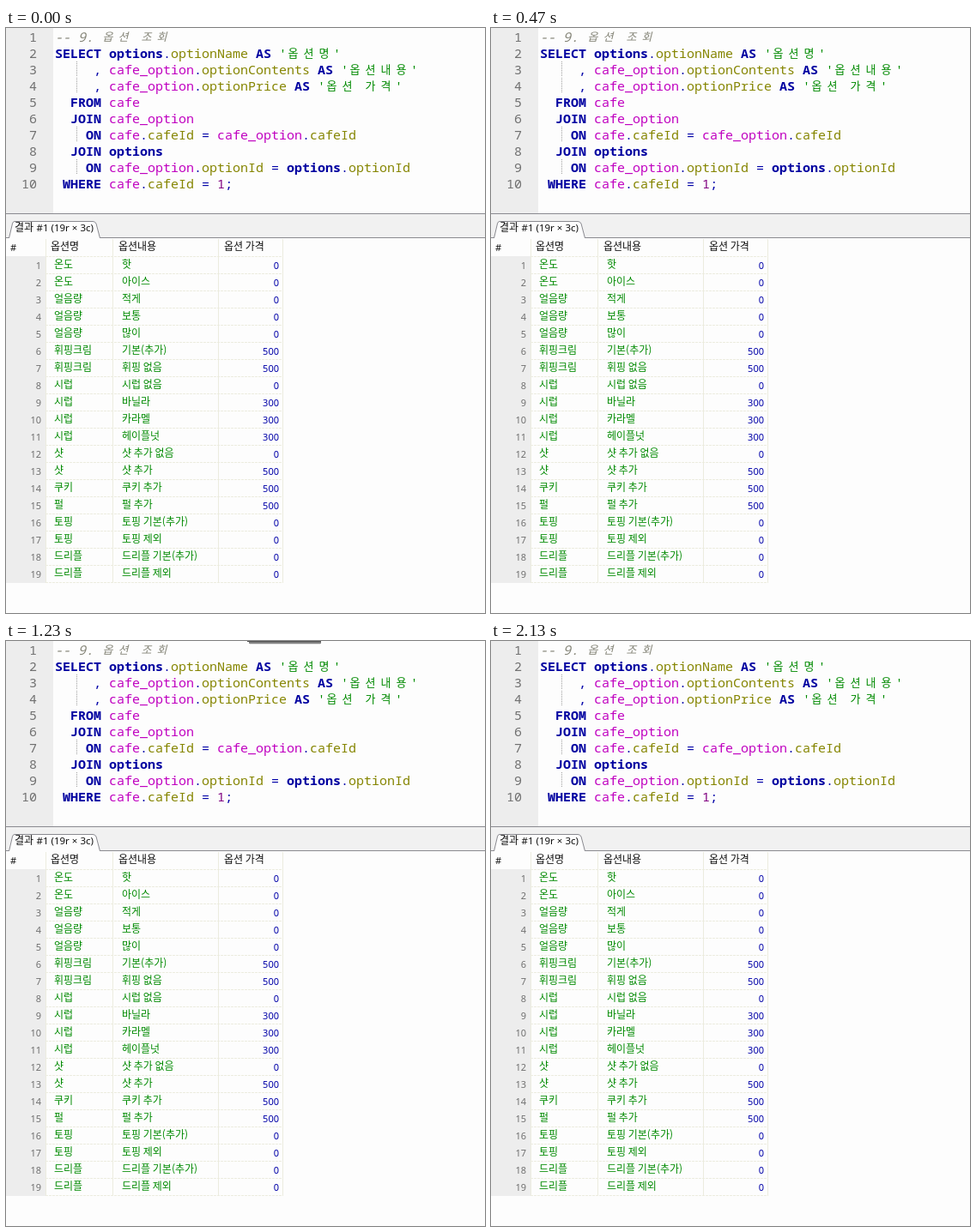
Recreate the animation shown at these times as an HTML page with a canvas. Size 558 by 682 pixels, loop 2160 ms.

```html
<!DOCTYPE html>
<html lang="ko">
<head>
<meta charset="utf-8">
<style>
html, body { margin: 0; width: 558px; height: 682px; overflow: hidden; background: #fdfdfd; }
canvas { display: block; }
</style>
</head>
<body>
<canvas id="stage" width="558" height="682"></canvas>
<script>
const ctx = document.getElementById('stage').getContext('2d');
const LOOP = 2160;
const MONO = '"Noto Sans Mono", "DejaVu Sans Mono", monospace';
const KOREAN = '"Noto Sans CJK KR", "Noto Sans CJK JP", "Noto Sans CJK", sans-serif';
const UI = '"Noto Sans", "Open Sans", sans-serif';
const PAPER = '#fdfdfd', PANEL = '#f1f1f1', GUTTER = '#ededed';
const GRID = '#ececdf', EDGE = '#8a8a90';
const LABEL = '#111', NUMBER = '#707070';
const CELL = 9, CODE_X = 57;

// Token kinds: k keyword, t table, c column, s string, p punctuation, n number, r comment
const INK = { k: '#0000a0', t: '#c000c0', c: '#858500', s: '#008a00', p: '#0000a8', n: '#800080', r: '#858578' };
const CODE = [
  [0, 'r:-- 9. 옵션 조회'],
  [0, 'k:SELECT ', 'k:options', 'p:.', 'c:optionName ', 'k:AS ', "s:'옵션명'"],
  [5, 'p:, ', 't:cafe_option', 'p:.', 'c:optionContents ', 'k:AS ', "s:'옵션내용'"],
  [5, 'p:, ', 't:cafe_option', 'p:.', 'c:optionPrice ', 'k:AS ', "s:'옵션 가격'"],
  [2, 'k:FROM ', 't:cafe'],
  [2, 'k:JOIN ', 't:cafe_option'],
  [4, 'k:ON ', 't:cafe', 'p:.', 'c:cafeId ', 'p:= ', 't:cafe_option', 'p:.', 'c:cafeId'],
  [2, 'k:JOIN ', 'k:options'],
  [4, 'k:ON ', 't:cafe_option', 'p:.', 'c:optionId ', 'p:= ', 'k:options', 'p:.', 'c:optionId'],
  [1, 'k:WHERE ', 't:cafe', 'p:.', 'c:cafeId ', 'p:= ', 'n:1', 'p:;']
];
const ROWS = [
  ['온도', '핫', 0], ['온도', '아이스', 0],
  ['얼음량', '적게', 0], ['얼음량', '보통', 0], ['얼음량', '많이', 0],
  ['휘핑크림', '기본(추가)', 500], ['휘핑크림', '휘핑 없음', 500],
  ['시럽', '시럽 없음', 0], ['시럽', '바닐라', 300], ['시럽', '카라멜', 300], ['시럽', '헤이플넛', 300],
  ['샷', '샷 추가 없음', 0], ['샷', '샷 추가', 500],
  ['쿠키', '쿠키 추가', 500], ['펄', '펄 추가', 500],
  ['토핑', '토핑 기본(추가)', 0], ['토핑', '토핑 제외', 0],
  ['드리플', '드리플 기본(추가)', 0], ['드리플', '드리플 제외', 0]
];

function rect(x, y, w, h, color) {
  ctx.fillStyle = color;
  ctx.fillRect(x, y, w, h);
}

function text(str, x, y, font, color, align = 'left') {
  ctx.font = font;
  ctx.fillStyle = color;
  ctx.textAlign = align;
  ctx.fillText(str, x, y);
}

function line(x1, y1, x2, y2, color, dash = []) {
  ctx.strokeStyle = color;
  ctx.lineWidth = 1;
  ctx.setLineDash(dash);
  ctx.beginPath();
  ctx.moveTo(x1, y1);
  ctx.lineTo(x2, y2);
  ctx.stroke();
  ctx.setLineDash([]);
}

function columnLines(top, bottom) {
  for (const x of [46.5, 124.5, 247.5, 322.5]) line(x, top, x, bottom, GRID);
}

// Latin letters take one cell, Korean syllables two.
function codeLine(parts, y) {
  let x = CODE_X + parts[0] * CELL;
  for (const part of parts.slice(1)) {
    const kind = part[0];
    const style = kind === 'k' ? 'bold ' : kind === 'r' ? 'italic ' : '';
    for (const ch of part.slice(2)) {
      const wide = ch >= '가' && ch <= '힣';
      if (wide) text(ch, x + 7.5, y - 1, style + '13px ' + KOREAN, INK[kind], 'center');
      else text(ch, x, y, style + '15px ' + MONO, INK[kind]);
      x += wide ? CELL * 2 : CELL;
    }
  }
}

function editor(redraw) {
  rect(0, 0, 558, 216, PAPER);
  rect(0, 0, 55, 216, GUTTER);
  for (const row of [2, 3, 6, 8]) line(82.5, row * 19 + 1, 82.5, row * 19 + 19, '#a0a0a0', [1, 1]);
  CODE.forEach((parts, i) => {
    const y = 16 + i * 19;
    text(i + 1, 36, y, '15px ' + MONO, NUMBER, 'right');
    codeLine(parts, y);
  });
  if (redraw) {
    line(194.5, 0, 194.5, 98, '#e6e6e6');
    line(0, 97.5, 195, 97.5, EDGE);
  }
}

function tab() {
  rect(0, 216, 558, 29, PANEL);
  line(0, 216.5, 558, 216.5, EDGE);
  line(0, 244.5, 558, 244.5, EDGE);
  ctx.beginPath();
  ctx.moveTo(3.5, 245);
  ctx.lineTo(7.5, 228);
  ctx.quadraticCurveTo(8, 225.5, 10, 225.5);
  ctx.lineTo(101, 225.5);
  ctx.quadraticCurveTo(104, 225.5, 105, 228);
  ctx.lineTo(109.5, 245);
  ctx.fillStyle = PAPER;
  ctx.fill();
  ctx.strokeStyle = EDGE;
  ctx.stroke();
  text('결과', 10, 237, '12px ' + KOREAN, LABEL);
  text('#1 (19r × 3c)', 35.5, 237, '11.5px ' + UI, LABEL);
}

function header() {
  text('#', 5, 260, '11px ' + UI, LABEL);
  text('옵션명', 52, 259, '12px ' + KOREAN, LABEL);
  text('옵션내용', 131, 259, '12px ' + KOREAN, LABEL);
  text('옵션 가격', 254, 259, '12px ' + KOREAN, LABEL);
  columnLines(246, 266);
}

function table(redraw) {
  const filled = redraw ? 12 : ROWS.length;
  const bottom = 266 + filled * 20;
  rect(0, 245, 558, 437, redraw ? PANEL : PAPER);
  if (redraw) {
    rect(46, 266, 512, bottom - 266, PAPER);
    rect(0, 647, 46, 35, PAPER);
  } else header();
  rect(0, 266, 46, 381, GUTTER);
  columnLines(266, bottom);
  for (let i = 0; i <= filled; i++) line(46, 266.5 + i * 20, 323, 266.5 + i * 20, GRID, [3, 1]);
  ROWS.forEach(([name, detail, price], i) => {
    const y = 280 + i * 20;
    text(i + 1, 41, y + 1, '11px ' + UI, NUMBER, 'right');
    if (i >= filled) return;
    text(name, 56, y, '12px ' + KOREAN, INK.s);
    text(detail, 135, y, '12px ' + KOREAN, INK.s);
    text(price, 318, y + 1, '11px ' + UI, INK.p, 'right');
  });
}

function draw(t) {
  const redraw = t >= 570 && t < 660;
  editor(redraw);
  table(redraw);
  tab();
  if (t >= 1070 && t < 1400) {
    rect(281, 0, 86, 1, '#505050');
    rect(283, 1, 84, 2, '#808080');
    rect(284, 3, 82, 1, '#d8d8d8');
  }
}

const start = performance.now();
function tick(now) {
  draw(Math.max(0, now - start) % LOOP);
  requestAnimationFrame(tick);
}
draw(0);
requestAnimationFrame(tick);
</script>
</body>
</html>
```
